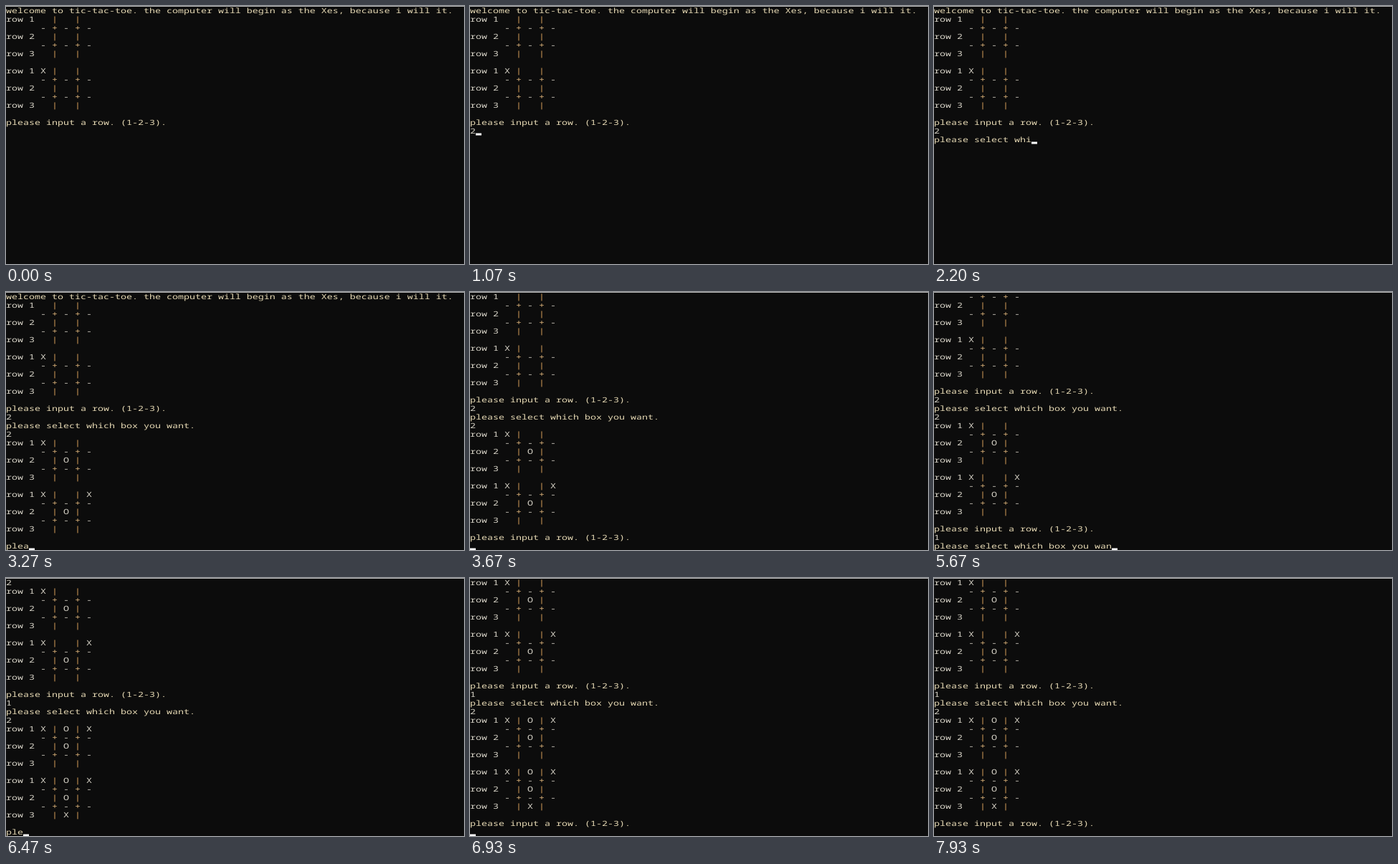
Recreate the animation shown at these times as an HTML page. Size 639x360 px, loop 8 s.

```html
<!DOCTYPE html>
<html lang="en">
<head>
<meta charset="utf-8">
<title>Tic-tac-toe console</title>
<style>
  html, body { margin: 0; width: 100%; height: 100%; overflow: hidden; background: #0c0c0c; }
  svg { display: block; width: 639px; height: 360px; }
  text {
    font: 13.333px "Noto Sans Mono", "DejaVu Sans Mono", monospace;
    fill: #d8d4c8; white-space: pre; text-rendering: geometricPrecision;
  }
  .prose { fill: #e6d9b4; }
  .bar { fill: #dda35c; }
  .plus { fill: #e0b67c; }
</style>
</head>
<body>
<svg viewBox="0 0 639 360">
  <rect width="639" height="360" fill="#0c0c0c"/>
  <!-- 8x16 console cells, shown at three-quarter height -->
  <g id="screen" transform="translate(0 .5) scale(1 .75)">
    <rect id="cursor" width="8" height="4" fill="#fff"/>
  </g>
  <rect width="639" height="1" fill="#b4b4b4"/>
</svg>
<script>
const LOOP = 8000, FPS = 15, ROWS = 30, CELL_W = 8, CELL_H = 16;
const CHARS_PER_FRAME = 1000 / FPS / 16;
const ASK_ROW = "please input a row. (1-2-3).";
const ASK_BOX = "please select which box you want.";

const screen = document.getElementById("screen");
const cursor = document.getElementById("cursor");
const rows = Array.from({ length: ROWS }, (_, i) => {
  const row = document.createElementNS("http://www.w3.org/2000/svg", "text");
  row.setAttribute("y", i * CELL_H + 13);
  row.setAttribute("xml:space", "preserve");
  screen.insertBefore(row, cursor);
  return row;
});

// Nine cells, left to right and top to bottom, plus a blank line.
function board(cells) {
  const row = n => `row ${n + 1} ` + [...cells.slice(n * 3, n * 3 + 3)].join(" | ");
  const rule = "      - + - + -";
  return [row(0), rule, row(1), rule, row(2), ""];
}

// Times are in ticks of 1/15 s; lead is how many letters the first tick shows.
const print = (at, ...lines) => ({ at, lines });
const type = (at, text, lead) => ({ at, text, lead });
const script = [
  print(0, "welcome to tic-tac-toe. the computer will begin as the Xes, because i will it.",
    ...board("         "), ...board("X        "), ASK_ROW),
  print(16, "2"),
  type(30, ASK_BOX, 4.6),
  print(44, "2"),
  print(49, ...board("X   O    "), ...board("X X O    ")),
  type(49, ASK_ROW, 4.4),
  print(72, "1"),
  type(78, ASK_BOX, 2.5),
  print(92, "2"),
  print(97, ...board("XOX O    "), ...board("XOX O  X ")),
  type(97, ASK_ROW, 3.2),
];
const cursorOff = [[0, 16], [24, 30], [47, 49], [71, 72], [95, 97], [119, 120]];

function transcript(tick) {
  const lines = [];
  let newline = true;
  for (const step of script) {
    if (tick < step.at) break;
    if (step.lines) {
      lines.push(...step.lines);
      newline = step.at === 0;
    } else {
      const count = Math.floor(step.lead + (tick - step.at) * CHARS_PER_FRAME);
      lines.push(step.text.slice(0, count));
      newline = count > step.text.length;
    }
  }
  if (newline) lines.push("");
  return lines;
}

function paint(line) {
  const color = /^[wp]/.test(line) ? "prose" : "";
  return `<tspan class="${color}">` + line
    .replace(/\|/g, '<tspan class="bar">|</tspan>')
    .replace(/\+/g, '<tspan class="plus">+</tspan>') + "</tspan>";
}

let shownTick = -1;
function draw(ms) {
  const tick = Math.floor((ms % LOOP + 5) * FPS / 1000) % (LOOP * FPS / 1000);
  if (tick === shownTick) return;
  shownTick = tick;
  const lines = transcript(tick).slice(-ROWS);
  rows.forEach((row, i) => { row.innerHTML = paint(lines[i] || ""); });
  const last = lines.length - 1;
  cursor.setAttribute("x", lines[last].length * CELL_W);
  cursor.setAttribute("y", last * CELL_H + 12);
  const hidden = cursorOff.some(([from, to]) => tick >= from && tick < to);
  cursor.setAttribute("visibility", hidden ? "hidden" : "visible");
}

const start = performance.now();
function loop() {
  draw(performance.now() - start);
  requestAnimationFrame(loop);
}
loop();
</script>
</body>
</html>
```
